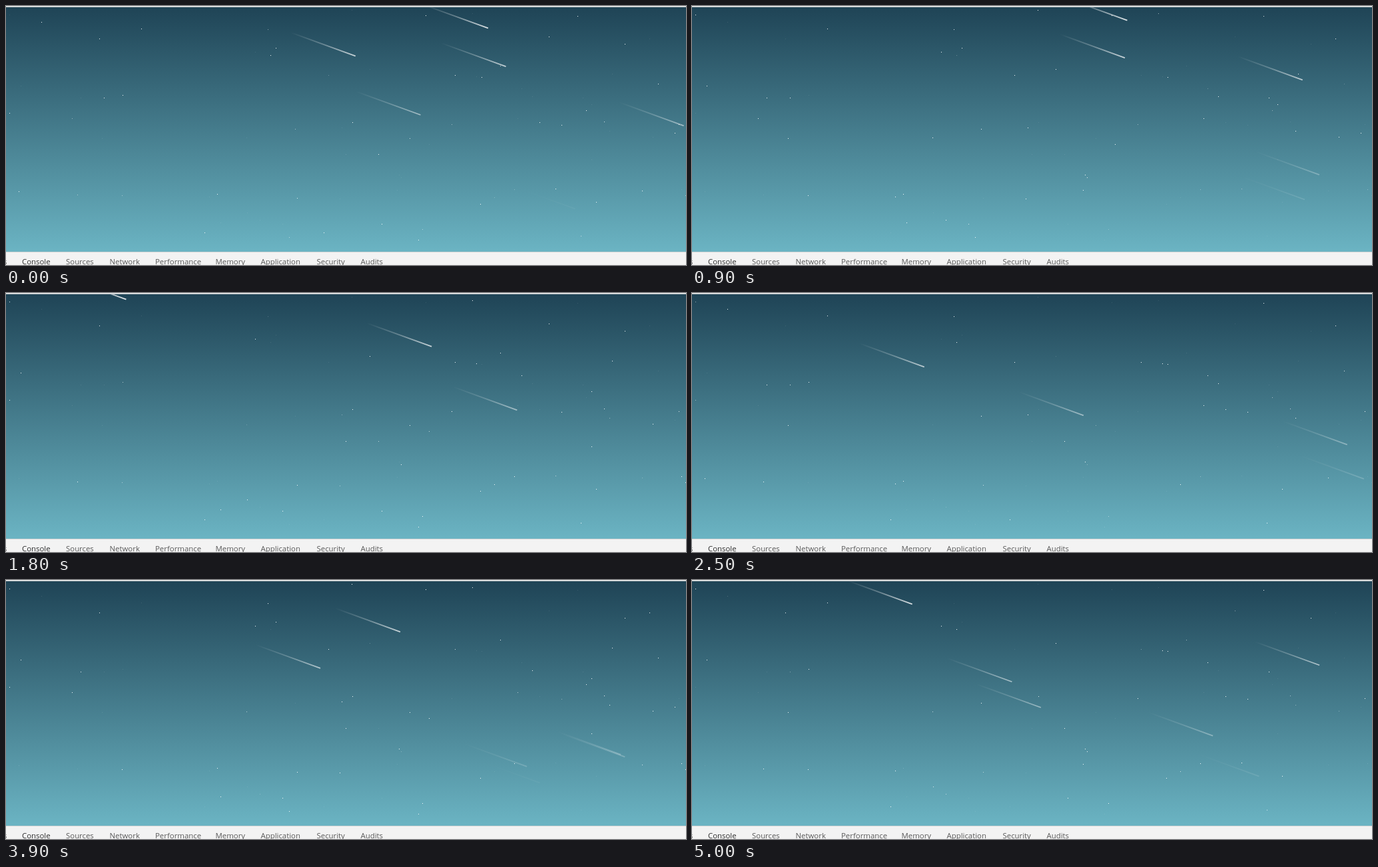
These frames come from a looping animation (1021x390 px, 5100 ms). An HTML page with a canvas:

```html
<!DOCTYPE html>
<html lang="en">
<head>
<meta charset="utf-8">
<title>Meteor shower</title>
<style>
  html, body { margin: 0; width: 100%; height: 100%; overflow: hidden; background: #f3f3f3; }
  canvas, svg { position: absolute; left: 0; display: block; }
  canvas { top: 2px; background: linear-gradient(#1f4456, #6bb4c3); box-shadow: 0 -1px #b0b8bc, 0 1px #d4d4d4; }
  svg { top: 370px; }
  text { font: 11.4px "Open Sans", "Noto Sans", sans-serif; fill: #5a5a5a; }
  .active { fill: #303030; }
</style>
</head>
<body>
<canvas id="sky" width="1021" height="368"></canvas>
<svg width="1021" height="20">
  <text x="1.5" y="18.5" text-anchor="end">Elements</text>
  <text x="24" y="18.5" class="active">Console</text>
  <text x="90" y="18.5">Sources</text>
  <text x="155.5" y="18.5">Network</text>
  <text x="224" y="18.5">Performance</text>
  <text x="314.5" y="18.5">Memory</text>
  <text x="382.5" y="18.5">Application</text>
  <text x="466.5" y="18.5">Security</text>
  <text x="532.5" y="18.5">Audits</text>
</svg>
<script>
const LOOP = 5100, STEP = 100, WIDTH = 1021, TOP = 2;
const ctx = document.getElementById('sky').getContext('2d');
const clamp = (v, lo, hi) => Math.min(hi, Math.max(lo, v));
const white = alpha => `rgba(255,255,255,${alpha})`;

let seed = 11;
const random = (lo, hi) => {
  seed = (seed * 16807) % 2147483647;
  return lo + (hi - lo) * seed / 2147483647;
};

// Each star twinkles at its own pace.
const stars = Array.from({ length: 82 }, () => ({
  x: Math.floor(random(5, WIDTH)),
  y: Math.floor(random(6, 355)),
  period: random(1.4, 3.5),
  phase: random(0, 1)
}));

function drawStar(t, { x, y, period, phase }) {
  const wave = Math.cos(2 * Math.PI * (t / period + phase));
  ctx.fillStyle = white(clamp(0.6 + 1.4 * wave, 0.1, 0.95));
  ctx.fillRect(x, y, 1, 1);
}

// Birth time in seconds and the x where each meteor enters at the top.
const meteors = [
  [-1.8, 143], [-0.71, 598], [-0.63, 241], [-0.32, 539], [-0.26, 350], [-0.11, 647],
  [0.5, 658], [0.63, 469], [0.83, 604], [1.11, 357], [1.52, 452], [1.77, 159],
  [2.1, 90], [2.5, 128], [2.64, 309], [2.67, 311], [3.41, 163], [3.63, 411],
  [3.98, 236], [4.23, 77], [4.42, 124], [4.53, 644], [4.88, 247]
];
const LIFE = 2, FALL = 308, SLOPE = 3 / 7;
const TAIL_X = 98, TAIL_Y = TAIL_X * Math.tan(Math.PI / 9);

// All meteors share one path: an even slowdown while the light fades.
function drawMeteor(t, [born, entryX]) {
  const left = 1 - (t - born) / LIFE;
  if (left <= 0 || left > 1) return;
  const fall = FALL * (1 - left * left);
  const x = entryX + fall / SLOPE, y = fall + 0.5;
  if (x > WIDTH + 20) return;
  const alpha = 0.9 * left ** 1.3;
  const fade = ctx.createLinearGradient(x, y, x - TAIL_X, y - TAIL_Y);
  fade.addColorStop(0, white(alpha));
  fade.addColorStop(0.5, white(alpha * 0.38));
  fade.addColorStop(1, white(0));
  ctx.strokeStyle = fade;
  ctx.lineWidth = 1.8;
  ctx.beginPath();
  ctx.moveTo(x, y);
  ctx.lineTo(x - TAIL_X, y - TAIL_Y);
  ctx.stroke();
}

const start = performance.now();
function draw() {
  const elapsed = Math.max(0, performance.now() - start) % LOOP;
  const t = Math.floor(elapsed / STEP) * STEP / 1000;
  ctx.setTransform(1, 0, 0, 1, 0, -TOP);
  ctx.clearRect(0, 0, WIDTH, 390);
  stars.forEach(s => drawStar(t, s));
  meteors.forEach(m => drawMeteor(t, m));
  requestAnimationFrame(draw);
}
draw();
</script>
</body>
</html>
```
